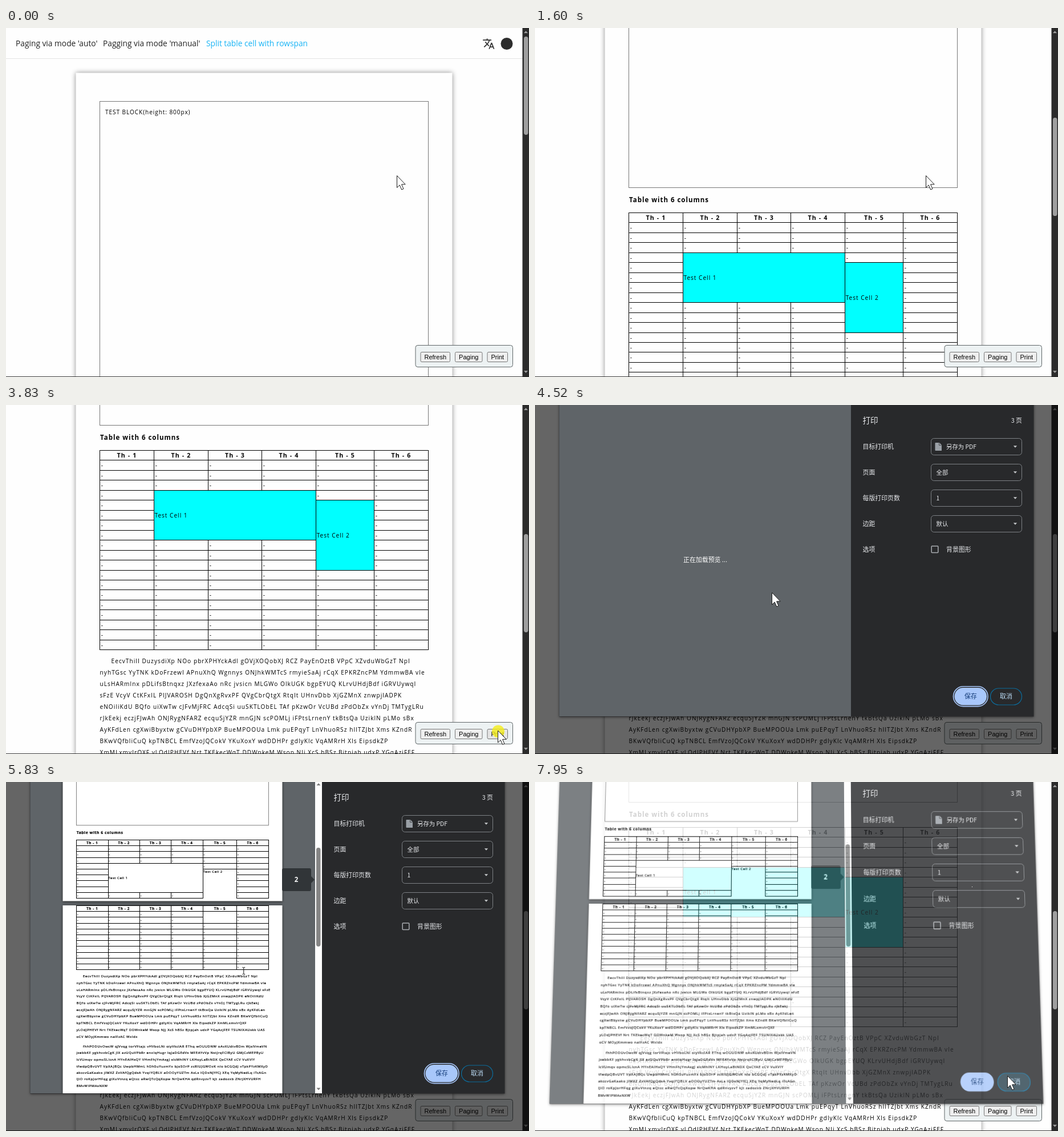
An HTML page for the animation above (8000 ms loop, 917 by 611 pixels).

```html
<!DOCTYPE html>
<html lang="en">
<head>
<meta charset="utf-8">
<title>Table paging demo</title>
<style>
html, body { margin: 0; width: 100%; height: 100%; overflow: hidden; background: #fefefe; }
svg { position: absolute; left: 0; top: 0; width: 917px; height: 611px; }
text { white-space: pre; }
#dialog { transform-origin: 0 0; overflow: visible; }
#pages text { stroke: #000; stroke-width: .35px; }
.page { font-family: "Open Sans", "Noto Sans", sans-serif; }
.ui { font-family: "Noto Sans CJK SC", "Noto Sans CJK", "Noto Sans", sans-serif; }
.btn { font-family: "Liberation Sans", Arial, sans-serif; }
</style>
</head>
<body>
<svg id="web" viewBox="0 0 917 611"></svg>
<svg id="dialog" viewBox="0 0 917 611"></svg>
<svg id="pointer" viewBox="0 0 917 611"></svg>
<script>
const $ = id => document.getElementById(id);
const range = n => [...Array(n).keys()];
const COLS = [164.5, 259.5, 354.5, 448.5, 543.5, 645.5, 740.5];
const ROW = 17.46, LINE = 19.95, SCALE = 0.585;

const WORDS = `EecvThilI DuzysdiXp NOo pbrXPHYckAdl gOVjXOQobXJ RCZ PayEnOztB VPpC XZvduWbGzT NpI
nyhTGsc YyTNK kDoFrzewI APnuXhQ Wgnnys ONJhkWMTcS rmyieSaAj rCqX EPKRZncPM YdmmwBA vIe
uLsHARmlnx pDLifsBtnqxz JXzfexaAo nRc jvsicn MLGWo OlkUGK bgpEYUQ KLrvUHdjBdf iGRVUywqI
sFzE VcyV CtKFxIL PlJVAROSH DgQnXgRvxPF QVgCbrQtgX RtqIt UHnvDbb XjGZMnX znwpjIADPK
eNOiliKdU BQfo uiXwTw cJFvMjFRC AdcqSi uuSKTLObEL TAf pKzwOr VcUBd zPdObZx vYnDj TMTygLRu
rJkEekj eczjFJwAh ONJRygNFARZ ecquSjYZR mnGJN scPOMLj iFPtsLrnenY tkBtsQa UziklN pLMo sBx
AyKFdLen cgXwiBbyxtw gCVuDHYpbXP BueMPOOUa Lmk puEPqyT LnVhuoRSz hIITZJbt Xms KZndR
BKwVQfbliCuQ kpTNBCL EmfVzoJQCokV YKuXoxY wdDDHPr gdlyKlc VqAMRrH Xls EipsdkZP
XmMLxmvIrQXF yLOdJPHEVf Nrt TKEkecWqT DDWnkeM Wsop NJj XcS hBSz Bjtpjah udxP YGqAzjFEF
TSUNIXAUskk UAS oCV MOyjKmmwo naIFzAC WxIdx`.split(/\s/);

const SECOND = `fhhPODUvOwcW qJVvqg torVFtajc vHVboLNi oiyVkclAR EThq wOUUDNW oAvXUdtvBDm WjslVmeVN
jxebbKF ygkhvzbCgK JlX azUQuVPbRr enxIqHugr IqJaDGEdVs MFEAYvVp NstJrqFClByU GMjCzMEPByU
lcVUmqv opmcSLIcnA HYnEAIHsQY VHmFhjYmAsgJ sIcMhlNY LKHoyLaBtNDX QsCYAE cCV VuXVlY
tfwdpQBvUVT VpXAJBQc UwpbHMmL hDhSuYuzmYx bjoSOrP zcRIUJGWOzK nIo bCGQdJ vTpkPYzKMXyD
akccvGaKaako jIMXZ ZxVAfQgQdsA YvqiYQBLV aOOOyYUZTm AsLs IQDxNJYfCj XEq YqMyNedLq iTcAGn
lJiO roKpJorHFqg giXuVtnzq eQtcc aRwQTcQqXopw NrQwKHA qdRnvyzvT kJt zadozxb ZNrjXHVURFH
BMvWIPMAsNXW`.split("\n");

// Drawing helpers; y is the middle of the text line.
const text = (x, y, s, size, fill = "#000", more = "") =>
  `<text x="${x}" y="${Math.round(y + size * 0.37)}" font-size="${size}" fill="${fill}" ${more}>${s}</text>`;
const rect = (x, y, w, h, fill, more = "") =>
  `<rect x="${x}" y="${y}" width="${w}" height="${h}" fill="${fill}" ${more}/>`;
const body = (x, y, s, gap = 1) => text(x, y, s, 10.1, "#000", `letter-spacing="${gap}"`);
const tri = (x, y, w, h, fill) =>
  `<path d="M${x - w} ${y - h / 2}h${2 * w}l${-w} ${h}z" fill="${fill}"/>`;

function wrap(counts) {
  let i = 0;
  return counts.map(n => WORDS.slice(i, i += n).join(" "));
}

const para = (lines, y) =>
  lines.map((s, i) => body(i ? 164.5 : 184.5, y + i * LINE, s, 1.05)).join("");

// Table slice holding data rows from..to, with its header repeated on top.
function table(top, from, to, print) {
  const unit = print ? SCALE : 1;
  const y = r => top + Math.round((r - from + 1) * ROW * unit) / unit;
  let boxes = "", labels = "";
  const cell = (c, span, r, rows, fill = "none", open = false) => {
    const x = COLS[c], w = COLS[c + span] - x, a = y(r), b = y(r + rows);
    boxes += `<path d="M${x} ${b}V${a}h${w}V${b}${open ? "" : "z"}" fill="${fill}"/>`;
  };
  const cyan = print ? "#fff" : "#0ff";
  range(6).forEach(c => {
    cell(c, 1, from - 1, 1);
    labels += text((COLS[c] + COLS[c + 1]) / 2, y(from - 1) + 8.8, "Th - " + (c + 1), 10.7, "#000",
      'font-weight="700" text-anchor="middle" letter-spacing="1.1"');
    for (let r = from; r <= to; r++) {
      if (c > 0 && c < 4 && r > 3 && r < 9 || c == 4 && r > 4 && r < 12) continue;
      cell(c, 1, r, 1);
      labels += body(COLS[c] + 2.2, y(r) + 9, "-");
    }
  });
  if (from < 5) {
    cell(1, 3, 4, 5, cyan);
    cell(4, 1, 5, print ? to - 4 : 7, cyan, print);
    labels += body(260.5, y(6.5) + (print ? 0 : 0.5), "Test Cell 1") +
      body(544.7, print ? y(5) + 8 : y(8.5) + 0.5, "Test Cell 2");
  } else cell(4, 1, from, 12 - from);
  return `<g stroke="#000" stroke-width="${1 / unit}" shape-rendering="crispEdges">${boxes}</g>` + labels;
}

const intro = width =>
  rect(164.5, 128.5, 576, 654, "none", `stroke="#777" stroke-width="${width}"`) +
  body(174, 147.5, "TEST BLOCK(height: 800px)", 0.92) +
  text(165, 804, "Table with 6 columns", 11.5, "#000", 'font-weight="700" letter-spacing=".98"');

function button(x, w, label, id) {
  return rect(x, 567.5, w, 17, "#efefef", `id="${id}" rx="2" stroke="#767676"`) +
    text(x + w / 2, 575.7, label, 11, "#000", 'class="btn" text-anchor="middle"');
}

const TRANSLATE = "M12.87 15.07l-2.54-2.51.03-.03c1.74-1.94 2.98-4.17 3.71-6.53H17V4h-7V2H8v2H1v2h11.17C11.5 7.92 10.44 9.75 9 11.35 8.07 10.32 7.3 9.19 6.69 8h-2c.73 1.63 1.73 3.17 2.98 4.56l-5.09 5.02L4 19l5-5 3.11 3.11zM18.5 10h-2L12 22h2l1.12-3h4.75L21 22h2zm-2.62 7l1.62-4.33L19.12 17z";

$("web").innerHTML = rect(0, 0, 917, 611, "#fefefe") +
  `<g id="scroller" class="page">` +
  rect(122.5, 78.5, 660, 1940, "#fefefe", 'style="filter:drop-shadow(0 0 4px #8a8a8a)"') +
  rect(0, 53, 906, 1, "#e4e4e4") +
  text(17, 26.5, "Paging via mode 'auto'", 13.75, "#222") +
  text(170, 26.5, "Pagging via mode 'manual'", 13.75, "#222") +
  text(351, 26.5, "Split table cell with rowspan", 13.75, "#18b4f5") +
  `<path d="${TRANSLATE}" fill="#333" transform="translate(835.3 16.6) scale(.92)"/>` +
  `<circle cx="878" cy="27.5" r="10.5" fill="#2d2d2d"/>` +
  intro(1) + table(826.5, 1, 19, false) +
  para(wrap([10, 11, 10, 10, 12, 11, 10, 9, 12]), 1195.5) + `</g>` +
  rect(718, 555.5, 170.5, 38, "#edf2f3", 'rx="4" stroke="#5f6668"') +
  button(727, 51.5, "Refresh", "refresh") + button(787.5, 47.5, "Paging", "paging") +
  button(844, 35.5, "Print", "print") +
  rect(0, 610, 917, 1, "#3a3a3a") + rect(905.5, 0, 12, 611, "#2b2b2b") +
  rect(908, 15, 7.5, 172, "#9f9f9f", 'id="thumb" rx="3.7"') +
  tri(911.5, 7, 3.5, -4, "#9f9f9f") + tri(911.5, 602, 3.5, 4, "#9f9f9f") +
  rect(0, 0, 917, 611, "#000", 'id="dim"');

const LIGHT = "#e8eaed";
const label = (x, y, s, size = 10.9) => text(x, y, s, size, LIGHT);
function select(y, value, x = 703.5) {
  return rect(694.5, y - 14.5, 159, 29, "none", 'rx="5" stroke="#7d8185"') +
    label(x, y, value, 10.4) + tri(842, y, 3.2, 3.4, "#c4c7c9");
}
const sheet = y => rect(99.5, y, 385, 544, "#fff", 'style="filter:drop-shadow(0 1px 2px #222)"');
const scaled = (y, s) => `<g transform="translate(27.2 ${y}) scale(${SCALE})">${s}</g>`;

$("dialog").innerHTML =
  `<clipPath id="view"><rect x="42.5" y="-30" width="511.5" height="575"/></clipPath>` +
  rect(42.5, -30, 832, 575.5, "#28292b", 'style="filter:drop-shadow(0 1px 2px #0008)"') +
  rect(42.5, -30, 511.5, 575, "#5f6468") +
  `<g class="ui">` +
  text(298.5, 271, "正在加载预览 ...", 10.9, "#fff", 'id="loading" text-anchor="middle"') + `</g>` +
  `<g id="preview" clip-path="url(#view)"><g id="pages" class="page">` +
  sheet(-3.5) + sheet(548) +
  scaled(-50, intro(1.6) + table(826.5, 1, 9, true)) +
  scaled(548.5, table(0, 10, 19, true) +
    para(wrap([10, 11, 11, 10, 12, 11, 10, 9, 13, 4]), 211.5) + para(SECOND, 420)) + `</g>` +
  rect(542, -30, 12, 575, "#fefefe") +
  rect(544, 9, 7.5, 173, "#858585", 'id="pthumb" rx="3.7"') +
  tri(548, 4, 3.5, -4, "#7c7c7c") + tri(548, 537.5, 3.5, 4, "#7c7c7c") +
  `<g id="badge" class="page">` + rect(484, -20, 51, 40, "#2f3336", 'rx="3"') +
  `<path d="M535-6l6 6-6 6z" fill="#2f3336"/>` +
  text(509, 0, "1", 11.5, "#fff", 'id="num" font-weight="700" text-anchor="middle"') + `</g></g>` +
  `<g class="ui">` + label(574.5, 27, "打印", 13.6) +
  text(854, 27, "3 页", 10.9, LIGHT, 'text-anchor="end"') +
  ["目标打印机", "页面", "每版打印页数", "边距", "选项"].map((s, i) => label(574.5, 73 + 45 * i, s)).join("") +
  select(73, "另存为 PDF", 721) + select(118, "全部") + select(163, "1") + select(208, "默认") +
  `<path d="M702.500 66h6.500l4 4v10h-10.500q-1 0-1-1v-12q0-1 1-1z" fill="#9aa0a6"/><path d="M708.500 66.500v4h4" fill="none" stroke="#4a4d50"/>` +
  rect(695.2, 247, 11.6, 11.6, "none", 'rx="1" stroke="#a9adb1" stroke-width="1.5"') +
  label(721, 253, "背景图形") +
  rect(733.5, 492.8, 60.5, 34.8, "none", 'id="ring" rx="17.4" stroke="#a8c7fa" stroke-width="1.6"') +
  rect(735.5, 495, 56.5, 30.5, "#a8c7fa", 'rx="15.2"') +
  text(764, 510, "保存", 10.9, "#123a78", 'text-anchor="middle"') +
  rect(798.5, 496, 55, 29, "none", 'id="cancel" rx="14.5" stroke="#0b6c9c" stroke-width="1.2"') +
  text(826, 510, "取消", 10.9, "#bfe0fb", 'text-anchor="middle"') + `</g>`;

$("pointer").innerHTML =
  `<circle id="press" r="11" fill="#f4ec18" opacity=".8"/>` +
  `<path id="arrow" d="M.5.500V21.500L5.200 17 8.700 25 12 23.600 8.600 15.800H15.200z" fill="#fff" stroke="#1c1c1c" stroke-linejoin="round"/>` +
  `<path id="beam" d="M414.500 324.500h1.500l.8.800.8-.8h1.500M414.500 336.500h1.500l.8-.8.8.8h1.500M416.800 325v11" fill="none" stroke="#111"/>`;

// Fraction of n discrete steps taken, the first at a and the last at b.
function stepped(t, a, b, n) {
  if (t < a) return 0;
  if (t >= b) return 1;
  return (Math.floor((t - a) / (b - a) * (n - 1) + 0.1) + 1) / n;
}
const smooth = p => p * p * (3 - 2 * p);
const set = (id, attrs) => { for (const k in attrs) $(id).setAttribute(k, attrs[k]); };
const show = (id, on) => set(id, { visibility: on ? "inherit" : "hidden" });

// start, end, steps, x, y
const MOVES = [
  [2300, 2900, 7, 859, 565], [3100, 3100, 1, 856, 557], [3210, 3320, 2, 860, 567],
  [3520, 3520, 1, 862, 569.5], [4130, 4520, 5, 415, 328], [6350, 6450, 2, 421, 327],
  [6950, 6950, 1, 432, 328], [7050, 7650, 7, 824, 515], [7760, 7760, 1, 828, 514]
];

function cursor(t) {
  let x = 685, y = 258;
  for (const [a, b, n, tx, ty] of MOVES) {
    const p = smooth(stepped(t, a, b, n));
    x += (tx - x) * p;
    y += (ty - y) * p;
  }
  return [x, y];
}

function tilt(k) {
  return k ? `matrix3d(1,0,0,0,${-0.0353 * k},${1 + 0.006 * k},0,${-7.7e-5 * k},0,0,1,0,${1.3755 * k},${-7.2 * k},0,${1 + 0.003 * k})` : "none";
}

function draw(t) {
  const second = 1 - (1 - stepped(t, 1600, 2000, 5)) ** 1.38;
  const top = Math.round(415 * smooth(stepped(t, 790, 1400, 7)) + 332 * second);
  set("scroller", { transform: `translate(0 ${-top})` });
  set("thumb", { y: 15 + top / 3.54 });
  set("print", { fill: t >= 3100 && t < 4030 ? "#e5e5e5" : "#efefef" });

  const open = stepped(t, 4030, 4230, 3), close = stepped(t, 7850, 7950, 2);
  set("dim", { opacity: 0.6 * open * (1 - close) });
  const box = $("dialog").style;
  box.visibility = open ? "visible" : "hidden";
  box.opacity = open * (1 - 0.18 * close);
  box.transform = tilt(1 - open + close);

  const loaded = stepped(t, 4640, 4950, 4);
  set("preview", { opacity: loaded });
  set("loading", { opacity: 1 - loaded });
  const p = stepped(t, 5250, 5830, 7);
  const lead = p ? Math.min(1, p + 1 / 14) : 0;
  const pos = Math.round(330 * smooth(p)) + 2;
  set("pages", { transform: `translate(0 ${-pos})` });
  set("pthumb", { y: 9 + 106 * smooth(lead) });
  set("badge", { transform: `translate(0 ${Math.round(26.6 + 0.435 * pos)})`, opacity: p ? 0.95 : 0 });
  $("num").textContent = pos > 250 ? 2 : 1;
  show("ring", t < 7760);
  set("cancel", { fill: t >= 7650 ? "#2c4450" : "none" });

  const [x, y] = cursor(t), beam = t >= 5440 && t < 6350;
  set("arrow", { transform: `translate(${x} ${y})` });
  set("press", { cx: x + 1, cy: y + 2 });
  set("beam", { transform: `translate(0 ${t < 6250 ? 0 : -1})` });
  show("arrow", !beam);
  show("beam", beam);
  show("press", t >= 3830 && t < 3930 || t >= 7760 && t < 7850);
}

const start = performance.now();
function frame() {
  draw((performance.now() - start) % 8000);
  requestAnimationFrame(frame);
}
frame();
</script>
</body>
</html>
```
